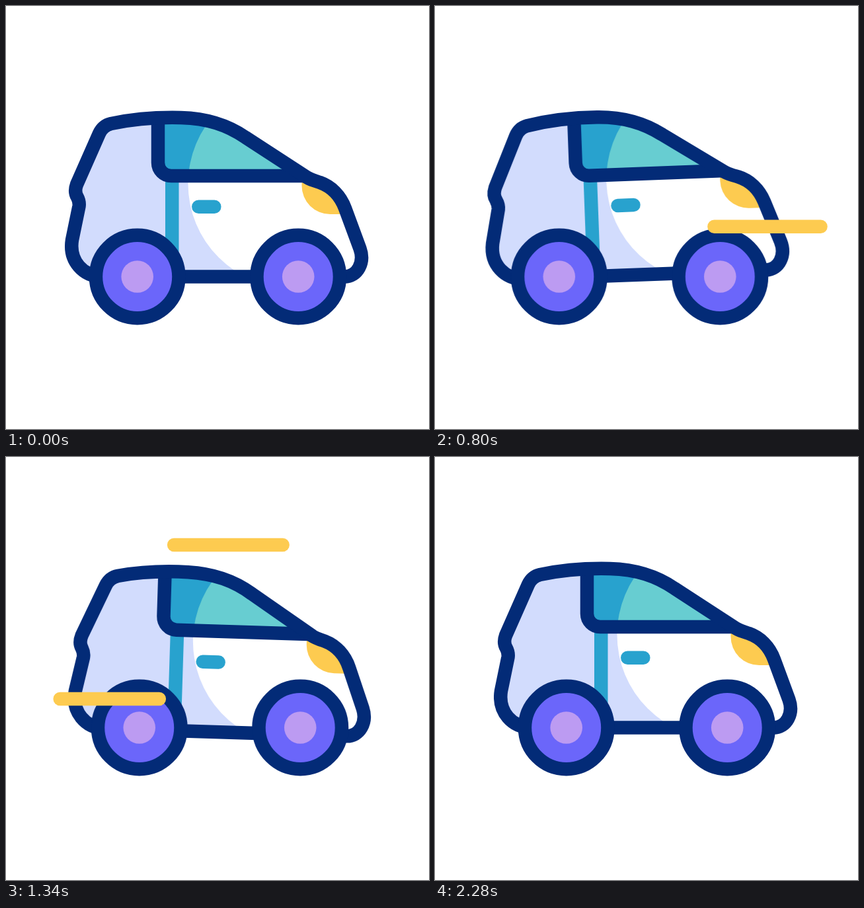
Recreate the animation shown at these times as an HTML page. Size 640x640 px, loop 2400 ms.

```html
<!DOCTYPE html>
<html lang="en">
<head>
<meta charset="utf-8">
<title>Small car</title>
<style>
  @property --head { syntax: "<length>"; inherits: false; initial-value: 0px; }
  @property --tail { syntax: "<length>"; inherits: false; initial-value: 0px; }

  :root {
    --navy: #032b77;
    --blue: #28a2ce;
    --yellow: #fdcb50;
    --loop: 2.4s;
    --ease: cubic-bezier(.333, 0, .667, 1);
  }
  html, body { margin: 0; width: 100%; height: 100%; overflow: hidden; background: #fff; }
  svg { display: block; width: 100vw; height: 100vh; }

  .line, .streak { fill: none; stroke-width: 20.5; stroke-linejoin: round; stroke-linecap: round; }
  .line { stroke: var(--navy); }
  .handle { stroke: var(--blue); }

  #car { animation: drive var(--loop) var(--ease) infinite; }
  #body {
    transform-origin: 320px 410px;
    animation: tilt var(--loop) var(--ease) infinite, bounce var(--loop) var(--ease) infinite;
  }

  @keyframes drive {
    0%, 89.6%, 100% { transform: translateX(0); }
    22.5% { transform: translateX(-46px); }
    46% { transform: translateX(33px); }
    67.9% { transform: translateX(-37.3px); }
  }
  @keyframes tilt {
    0%, 91.7%, 100% { rotate: 0deg; }
    25% { rotate: -2.7deg; }
    66.7% { rotate: 2.7deg; }
  }
  @keyframes bounce {
    0%, 92.9%, 100% { translate: 0 0; }
    23.3% { translate: 0 9px; }
    42.1% { translate: 0 -12.6px; }
    55.8% { translate: 0 6.8px; }
    77.5% { translate: 0 -8.4px; }
  }

  /* The head runs ahead, the tail follows it along the same path. */
  .streak {
    stroke: var(--yellow);
    stroke-dasharray: calc(var(--head) - var(--tail)) 999px;
    stroke-dashoffset: calc(-1 * var(--tail));
    animation: streak var(--loop) var(--ease) calc(var(--at) - var(--loop)) infinite;
  }
  @keyframes streak {
    0% { --head: 0px; --tail: 0px; visibility: visible; }
    12.7% { --tail: 0px; }
    19.2% { --head: 200px; }
    28.9% { --tail: 200px; visibility: visible; }
    28.91%, 100% { --head: 200px; --tail: 200px; visibility: hidden; }
  }
</style>
</head>
<body>
<svg viewBox="0 0 640 640">
  <defs>
    <path id="shell" d="M146 409.500C117 409.500 95 386 100 354L110.500 303Q111.500 296 107.800 289Q103 281 107 270L141 193Q146.500 181 159 178C190 171.500 225 168 265 169C305 170 335 180 362.500 198.900L455.500 259.400C461.500 263 467 264.500 475 267C492 273 506 287 513 306L535.500 367C543 388 532 409.500 512 409.500Z"/>
    <clipPath id="inShell"><use href="#shell"/></clipPath>
    <clipPath id="inGlass"><path d="M230 150V237A20 20 0 0 0 250 257H470V150Z"/></clipPath>
    <circle id="light" cx="433" cy="269" r="157.5"/>
    <g id="wheel">
      <circle r="62.75" fill="#6b66fa" stroke="#032b77" stroke-width="20.5"/>
      <circle r="24.3" fill="#bc9bf2"/>
    </g>
  </defs>

  <g id="car">
    <g id="body">
      <g clip-path="url(#inShell)">
        <rect x="80" y="140" width="480" height="300" fill="#d2dcfd"/>
        <use href="#light" fill="#fff"/>
        <rect x="241" y="257" width="20.5" height="152" fill="#28a2ce"/>
        <path d="M447.500 250V272A43 43 0 0 0 490.500 315H540V250Z" fill="#fdcb50"/>
        <g clip-path="url(#inGlass)">
          <rect x="230" y="150" width="240" height="107" fill="#28a2ce"/>
          <use href="#light" fill="#67cdd1"/>
        </g>
      </g>
      <path class="line handle" d="M291.300 303.800H315.300"/>
      <path class="line" d="M230 172V237A20 20 0 0 0 250 257H449"/>
      <use class="line" href="#shell"/>
    </g>
    <use href="#wheel" x="198.700" y="409.500"/>
    <use href="#wheel" x="442.200" y="409.500"/>
  </g>

  <path class="streak" style="--at: 66ms" d="M620 204.700h-200"/>
  <path class="streak" style="--at: 85ms" d="M239 291.700h-200"/>
  <path class="streak" style="--at: 404ms" d="M612 333.800h-200"/>
  <path class="streak" style="--at: 980ms" d="M430 133h-200"/>
  <path class="streak" style="--at: 1030ms" d="M232 366h-200"/>
</svg>
</body>
</html>
```
